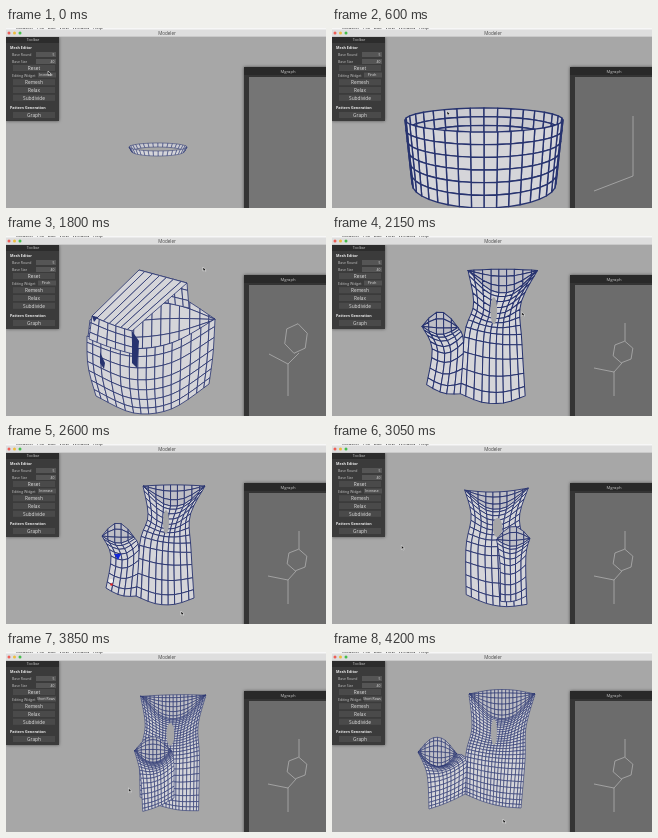
Write an HTML page with a canvas that moves like this. It is 320 by 180 pixels and loops after 4.25 s.

```html
<!DOCTYPE html>
<html>
<head>
<meta charset="utf-8">
<style>
html, body { margin: 0; width: 100%; height: 100%; overflow: hidden; background: #a7a7a7; }
canvas { display: block; }
</style>
</head>
<body>
<canvas id="stage" width="320" height="180"></canvas>
<script>
const c = document.getElementById('stage').getContext('2d');
const LOOP = 4250, STEP = 50;
const NAVY = '#27336f', CELL = '#d5d5d9', INNER = '#bfbfc6';

const mix = (a, b, k) => a + (b - a) * k;
const ease = k => k * k * (3 - 2 * k);
const ramp = (t, a, b) => ease(Math.min(1, Math.max(0, (t - a) / (b - a))));

// Blend of neighbouring entries at a fractional index
function blend(list, s) {
  const i = Math.min(list.length - 2, Math.floor(s));
  return list[i].map((v, j) => mix(v, list[i + 1][j], s - i));
}

// Last value whose start time has passed
const pick = (list, t) => list.filter(e => e[0] <= t).pop()[1];

function rect(x, y, w, h, fill) {
  c.fillStyle = fill;
  c.fillRect(x, y, w, h);
}

function text(s, x, y, size, fill, align = 'center', weight = '') {
  c.font = `${weight} ${size}px "Open Sans", sans-serif`;
  c.textAlign = align;
  c.fillStyle = fill;
  c.fillText(s, x, y);
}

function dot(x, y, rx, ry, fill) {
  c.fillStyle = fill;
  c.beginPath();
  c.ellipse(x, y, rx, ry, 0, 0, 7);
  c.fill();
}

function poly(pts, fill, stroke) {
  c.beginPath();
  for (const p of pts) c.lineTo(p[0], p[1]);
  if (fill) {
    c.closePath();
    c.fillStyle = fill;
    c.fill();
  }
  if (stroke) {
    c.strokeStyle = stroke;
    c.stroke();
  }
}

// Catmull-Rom through evenly spaced points, u in 0..1
function curve(p, u) {
  const n = p.length - 1, i = Math.min(n - 1, Math.floor(u * n)), f = u * n - i;
  const P = j => p[Math.max(0, Math.min(n, j))];
  return [0, 1].map(d => {
    const [a, b, e, g] = [P(i - 1)[d], P(i)[d], P(i + 1)[d], P(i + 2)[d]];
    return b + f / 2 * (e - a + f * (2 * a - 5 * b + 4 * e - g + f * (3 * (b - e) + g - a)));
  });
}

// Sagging row between two ends
const arc = (x1, y1, x2, y2, sag) => [0, 1, 2, 3].map(i =>
  [mix(x1, x2, i / 3), mix(y1, y2, i / 3) + (i % 3 ? sag : 0)]);

// Quad mesh over a surface given by its rows
function sheet(rows, nu, nv, fill) {
  const arcs = rows.map(r => arc(...r));
  const point = (i, j) => curve(arcs.map(r => curve(r, i / nu)), j / nv);
  for (let j = 0; j < nv; j++)
    for (let i = 0; i < nu; i++)
      poly([point(i, j), point(i + 1, j), point(i + 1, j + 1), point(i, j + 1)], fill, NAVY);
}

// centre x, top y, rx, top ry, height, bottom ry
const rings = [
  [152, 119, 29, 4, 4.5, 4.5],
  [152, 92, 79, 12, 64, 24],
  [138, 92, 63, 12, 62, 24],
  [145, 91, 64, 24, 58, 29]
];

function ring(t) {
  const stage = ramp(t, 150, 500) + ramp(t, 700, 1050) + ramp(t, 1250, 1650);
  const [cx, cy, rx, ry, h, ryB] = blend(rings, stage);
  const rows = Math.max(1, Math.round(h / 10.4)), cols = 36, da = 2 * Math.PI / cols;
  const point = (i, v) => {
    const a = i * da;
    return [cx + rx * (1 - .09 * v) * Math.cos(a), cy + h * v + mix(ry, ryB, v) * Math.sin(a)];
  };
  c.lineWidth = rx / 58;
  for (const front of [0, 1])
    for (let k = 0; k < cols / 2; k++) {
      const i = k + (front ? 0 : cols / 2);
      const raised = t >= 850 && Math.cos(4 * (i + .5) * da) > -.2;
      for (let j = raised ? -1 : 0; j < rows; j++) {
        const v = j / rows, w = (j + 1) / rows;
        poly([point(i, v), point(i + 1, v), point(i + 1, w), point(i, w)], front ? CELL : '#cbcbd1', NAVY);
      }
    }
}

function bridge() {
  const far = [133, 34, 181, 47, 0], near = [86, 80, 126, 95, 1];
  c.lineWidth = .8;
  sheet([[84, 84, 209, 83, -25], [82, 101, 209, 84, 17]], 14, 4, CELL);
  sheet([far, [135, 61, 183, 72, 0]], 7, 3, CELL);
  sheet([far, near], 7, 1, CELL);
  sheet([[81, 100, 209, 83, 18], [82, 130, 207, 118, 22], [90, 160, 203, 148, 21]], 15, 7, CELL);
  sheet([near, [83, 103, 127, 118, 1]], 5, 3, CELL);
  poly([[126, 95], [133, 105], [131, 132], [126, 127]], NAVY);
  poly([[94, 116], [99, 127], [98, 133], [94, 127]], NAVY);
  poly([[86, 80], [92, 81], [88, 86]], NAVY);
}

// Tall branch, short branch and hole. A branch has its rows from rim to
// bottom, each as left end, right end and sag, then the sag of the far rim.
const tall = [
  [137, 42, 199, 42, 18, 142, 72, 184, 72, 9, 134, 98, 185, 105, 2, 130, 152, 188, 154, 7, -1],
  [131, 48, 195, 45, 18, 138, 72, 189, 72, 10, 134, 105, 194, 100, 7, 136, 150, 198, 163, 5, 4],
  [137, 42, 203, 42, 22, 140, 75, 194, 75, 8, 134, 102, 193, 108, 2, 133, 142, 189, 156, 3, -4]
];
const short = [
  [96, 92, 128, 93, 6, 105, 112, 133, 106, 6, 100, 144, 130, 152, 3, -12],
  [194, 97, 228, 95, 7, 195, 122, 220, 114, 5, 198, 163, 222, 152, 2, -11],
  [86, 100, 125, 102, 12, 95, 122, 134, 108, 4, 97, 157, 133, 142, 1, -14]
];
const holes = [[160, 78, 3, 12], [168, 86, 5.5, 9], [162, 80, 3, 13]];

function branch(data, nu, inner, outer) {
  const rows = [];
  for (let i = 0; i + 5 <= data.length; i += 5) rows.push(data.slice(i, i + 5));
  const far = [...rows[0].slice(0, 4), data[data.length - 1]];
  sheet([far, rows[0]], nu, inner, INNER);
  sheet(rows, nu, outer, CELL);
}

function branches(t) {
  const turn = ramp(t, 2700, 3250) + ramp(t, 3450, 4150);
  const fine = t >= 3450 ? 2 : 1;
  const zoom = mix(1.12, 1, ramp(t, 2150, 2500));
  c.save();
  c.translate(145, 105);
  c.scale(zoom, zoom);
  c.translate(-145, -105);
  c.lineWidth = fine > 1 ? .6 : .9;
  branch(blend(tall, turn), 9 * fine, 3 * fine, 13 * fine);
  dot(...blend(holes, turn), '#a5a5a7');
  branch(blend(short, turn), 5 * fine, 3 * fine, 8 * fine);
  c.restore();
  if (t >= 2450 && t < 2700) {
    poly([[108, 110], [115, 110], [112, 116]], '#1226d8');
    dot(105, 137, 2, 2, '#f4f4f4');
    dot(105.5, 140.5, 1.3, 1.3, '#e02222');
  }
}

function button(s, y) {
  rect(7, y - 5, 42, 6, '#4a4a4a');
  text(s, 28, y, 4.8, '#dedede');
}

const tools = [[0, 'Increase'], [450, 'Pinch'], [2200, 'Increase'], [3700, 'Short Rows']];

function toolbar(t) {
  c.shadowColor = '#0008';
  c.shadowBlur = 3;
  rect(0, 9, 53, 84, '#3b3b3b');
  c.shadowBlur = 0;
  rect(0, 9, 53, 6, '#2c2c2c');
  text('Toolbar', 27, 13.2, 3.6, '#c8c8c8');
  text('Mesh Editor', 4, 20.5, 3.7, '#eee', 'left', 'bold');
  text('Base Round', 6, 27.5, 3.5, '#c4c4c4', 'left');
  text('Base Size', 6, 34.5, 3.5, '#c4c4c4', 'left');
  for (const [y, s] of [[24, '5'], [31, '40']]) {
    rect(30, y, 20, 5, '#555');
    text(s, 48.5, y + 3.8, 3.4, '#ddd', 'right');
  }
  button('Reset', 42);
  text('Editing Widget', 6, 48.5, 3.5, '#c4c4c4', 'left');
  rect(32, 44.5, 18, 5, '#515151');
  text(pick(tools, t), 40, 48.3, 3.4, '#e4e4e4');
  ['Remesh', 'Relax', 'Subdivide'].forEach((s, i) => button(s, 56.2 + i * 7.8));
  text('Pattern Generation', 4, 80.5, 3.7, '#eee', 'left', 'bold');
  button('Graph', 89);
}

function menu() {
  rect(57, 39, 31, 60, '#383838');
  poly([[57, 44], [53, 47], [57, 50]], '#383838');
  ['Increase', 'Short Rows', 'Decrease', 'Short Dec', 'Pinch', 'Extrude'].forEach((s, i) => {
    const y = 42 + i * 9.4;
    rect(59, y, 27, 7, i === 4 ? '#151515' : '#4b4b4b');
    text(s, 72.5, y + 5.2, 4.4, '#dedede');
  });
}

const loop = (x, y, rx, ry) => Array.from({ length: 7 }, (_, i) => {
  const a = i * Math.PI / 3 - 1.4;
  return [x + rx * Math.cos(a), y + ry * Math.sin(a)];
});

function graph(t) {
  if (t < 450) return [];
  if (t < 850) return [[[301, 88], [301, 148], [262, 163]]];
  if (t < 1650) return [[[282, 158], [282, 111], [265, 97]], [[282, 111], [299, 92]], [[291, 102], [288, 91]]];
  if (t < 2150) return [[[282, 160], [282, 128], [263, 118]], [[282, 128], [293, 117]], loop(290, 102.5, 12, 15)];
  return [[[282, 160], [282, 136], [262, 132]], [[282, 136], [290, 127]],
    loop(291, 116, 10.5, 11), [[293, 105], [293, 87]]];
}

function graphPanel(t) {
  c.shadowColor = '#0008';
  c.shadowBlur = 3;
  rect(238, 39, 90, 150, '#343434');
  c.shadowBlur = 0;
  rect(238, 39, 82, 8, '#292929');
  text('Mgraph', 282, 45, 4.2, '#c4c4c4');
  rect(243, 49, 77, 131, t < 450 ? '#757575' : '#6c6c6c');
  c.lineWidth = .7;
  for (const line of graph(t)) poly(line, null, '#b9b9b9');
}

function titleBar() {
  rect(0, 0, 320, 9, '#dedede');
  rect(0, 0, 320, 1.5, '#f7f7f7');
  text('Modeler   File   Edit   View   Window   Help', 10, 1, 4.5, '#222', 'left');
  rect(0, 8.5, 320, .5, '#b5b5b5');
  ['#ee5f57', '#eebc3e', '#45bd4b'].forEach((fill, i) => dot(3 + i * 5.5, 5, 1.5, 1.5, fill));
  text('Modeler', 161, 6.8, 4.5, '#444');
}

// Stops of the pointer, moved between at the given times
const stops = [[42, 43], [115, 83], [70, 92], [197, 31], [175, 167], [24, 73], [171, 167]];
const moves = [[200, 600], [700, 1100], [1250, 1800], [1900, 2550], [2700, 3250], [3450, 4100]];

function cursor(t) {
  c.save();
  c.translate(...blend(stops, moves.reduce((s, [a, b]) => s + ramp(t, a, b), 0)));
  c.lineWidth = .6;
  poly([[0, 0], [0, 4.2], [1.1, 3.3], [2, 4.8], [2.6, 4.4], [1.9, 3], [3.1, 2.9], [0, 0]], '#111', '#eee');
  c.restore();
}

function draw(now) {
  const t = Math.floor(now % LOOP / STEP) * STEP;
  c.lineJoin = 'round';
  rect(0, 0, 320, 180, '#a7a7a7');
  if (t < 1650) ring(t);
  else if (t < 2150) bridge();
  else branches(t);
  toolbar(t);
  if (t >= 1050 && t < 1300) menu();
  graphPanel(t);
  titleBar();
  cursor(t);
  requestAnimationFrame(draw);
}
requestAnimationFrame(draw);
</script>
</body>
</html>
```
